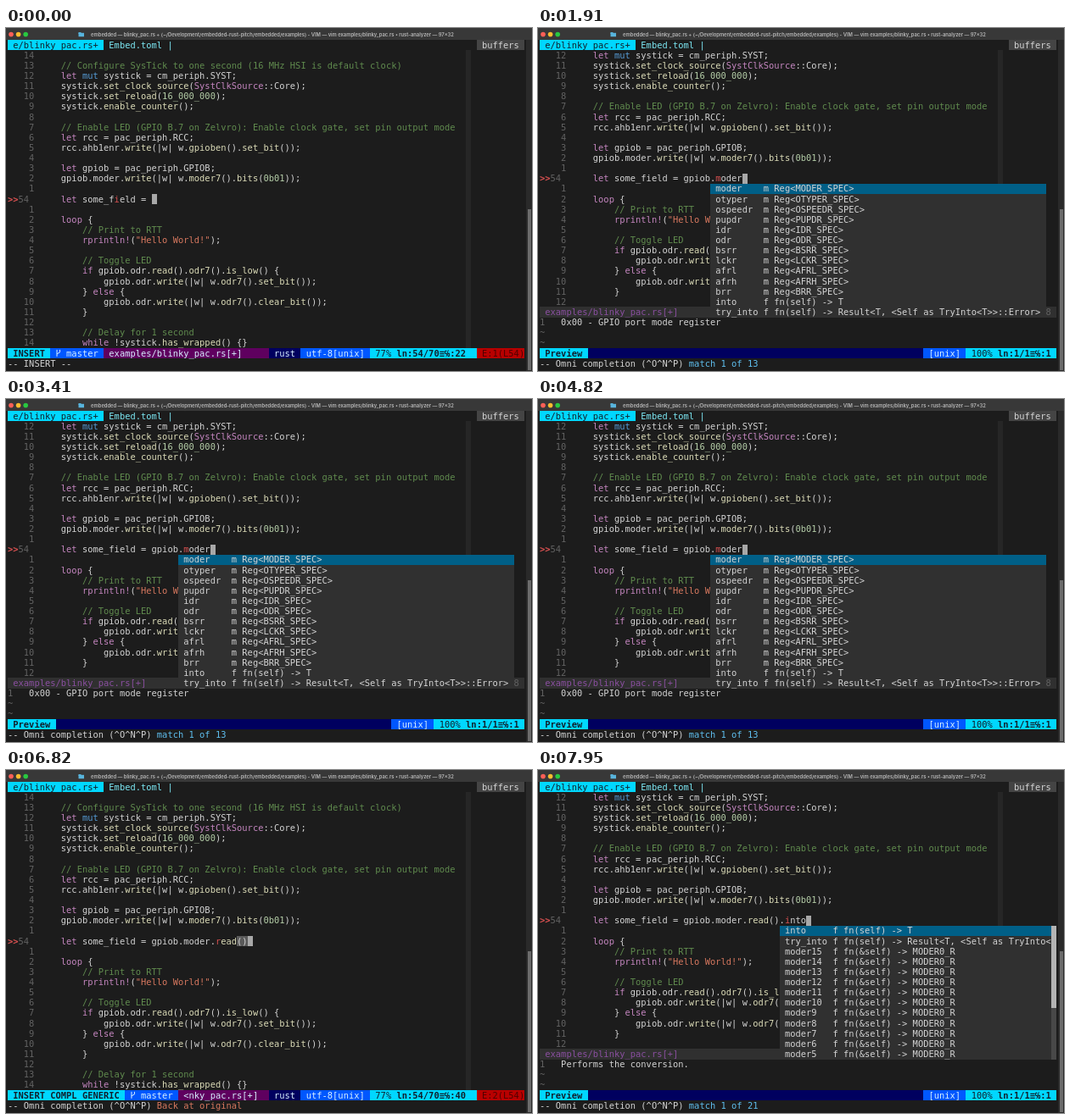
An HTML page with a canvas that plays this animation: 620x405 px, repeating every 8000 ms.

```html
<!DOCTYPE html>
<html lang="en">
<head>
<meta charset="utf-8">
<title>Editor completion</title>
<style>
html, body { margin: 0; width: 100%; height: 100%; overflow: hidden; background: #1c1c1c; }
canvas { display: block; }
</style>
</head>
<body>
<canvas id="stage" width="620" height="405"></canvas>
<script>
const ctx = document.getElementById("stage").getContext("2d");
const LOOP = 8000, COLS = 97, CELL_W = 6.28, CELL_H = 12.13, LEFT = 2, TOP = 14;
const MONO = '"DejaVu Sans Mono", monospace';
const C = {
  bg: "#1c1c1c", text: "#d4d4d4", dim: "#626262", comment: "#608b4e", keyword: "#c586c0",
  blue: "#569cd6", string: "#d7785f", number: "#b5cea8", call: "#dcdcb8", red: "#d75050",
  cyan: "#00d7ff", royal: "#0057ff", navy: "#00005f", purple: "#5f005f", menu: "#303030",
  selected: "#005f87", black: "#10202a", pale: "#d8f0ff"
};

const BEFORE = [
  "",
  "// Configure SysTick to one second (16 MHz HSI is default clock)",
  "let mut systick = cm_periph.SYST;",
  "systick.set_clock_source(SystClkSource::Core);",
  "systick.set_reload(16_000_000);",
  "systick.enable_counter();",
  "",
  "// Enable LED (GPIO B.7 on Zelvro): Enable clock gate, set pin output mode",
  "let rcc = pac_periph.RCC;",
  "rcc.ahb1enr.write(|w| w.gpioben().set_bit());",
  "",
  "let gpiob = pac_periph.GPIOB;",
  "gpiob.moder.write(|w| w.moder7().bits(0b01));",
  ""
];
const AFTER = [
  "",
  "loop {",
  "    // Print to RTT",
  '    rprintln!("Hello World!");',
  "",
  "    // Toggle LED",
  "    if gpiob.odr.read().odr7().is_low() {",
  "        gpiob.odr.write(|w| w.odr7().set_bit());",
  "    } else {",
  "        gpiob.odr.write(|w| w.odr7().clear_bit());",
  "    }",
  "",
  "    // Delay for 1 second",
  "    while !systick.has_wrapped() {}"
];
const PREFIX = "let some_field = ";

const INTO = ["into", "f", "fn(self) -> T"];
const TRY_INTO = ["try_into", "f", "fn(self) -> Result<T, <Self as TryInto<T>>::Error>"];
const registers = "moder otyper ospeedr pupdr idr odr bsrr lckr afrl afrh brr".split(" ")
  .map(name => [name, "m", `Reg<${name.toUpperCase()}_SPEC>`]);
const FIELDS = { col: 32, total: 13, items: [...registers, INTO, TRY_INTO] };
const METHODS = { col: 38, total: 8, items: [
  INTO, TRY_INTO,
  ["as_ptr", "f", "fn(&self) -> *mut <REG as RegisterSpec>::Ux"],
  ["read", "f", "fn(&self) -> <REG as Readable>::Reader"],
  ["reset", "f", "fn(&self)"],
  ["write", "f", "fn(&self, F)"],
  ["write_with_zero", "f", "unsafe fn(&self, F)"],
  ["modify", "f", "fn(&self, F)"]
] };
const READERS = { col: 45, total: 21, items: [INTO, TRY_INTO,
  ...Array.from({ length: 11 }, (_, i) => ["moder" + (15 - i), "f", "fn(&self) -> MODER0_R"])] };
const matching = start => ({ ...METHODS, items: METHODS.items.filter(([name]) => name.startsWith(start)) });

const STATES = [];
const at = (time, typed, extra = {}) => STATES.push({ time, typed, errors: 1, ...extra });
const typing = (start, gap, base, word, extra) =>
  [...word].forEach((_, i) => {
    const part = word.slice(0, i + 1);
    at(start + i * gap, base + part, typeof extra === "function" ? extra(part) : extra);
  });

at(0, "", { mark: 10 });
typing(300, 130, "", "gpiob.");
at(1200, "gpiob.", { menu: FIELDS, omni: true });
at(1560, "gpiob.moder", { menu: FIELDS, omni: true, preview: "0x00 - GPIO port mode register", mark: 23 });
at(5300, "gpiob.moder.", { errors: 2 });
at(5600, "gpiob.moder.", { errors: 2, menu: METHODS, omni: true });
typing(6050, 110, "gpiob.moder.", "read()", part =>
  ({ errors: 2, menu: matching(part), omni: true, generic: true, mark: 29 }));
at(7050, "gpiob.moder.read().", { errors: 2 });
at(7280, "gpiob.moder.read().", { errors: 2, menu: READERS, omni: true });
at(7500, "gpiob.moder.read().into", { menu: READERS, omni: true, preview: "Performs the conversion.", mark: 36 });

const colX = col => LEFT + col * CELL_W;
const rowY = row => TOP + row * CELL_H;

function fill(row, from, to, color, rows = 1) {
  const x = Math.round(colX(from)), y = Math.round(rowY(row));
  ctx.fillStyle = color;
  ctx.fillRect(x, y, Math.round(colX(to)) - x, Math.round(rowY(row + rows)) - y);
}

function put(row, col, text, color = C.text, bold = false) {
  ctx.font = `${bold ? "bold " : ""}10.4px ${MONO}`;
  ctx.textAlign = "left";
  ctx.fillStyle = color;
  [...text].forEach((ch, i) => {
    if (ch !== " ") ctx.fillText(ch, colX(col + i), rowY(row) + 9.6);
  });
}

function block(row, from, to, bg, text, color, bold) {
  fill(row, from, to, bg);
  put(row, from + 1, text, color, bold);
}

const TOKENS = /\/\/.*|"[^"]*"|rprintln!|SystClkSource|\b(?:let|loop|if|else|while|mut)\b|\b(?:0b01|16_000_000)\b|\w+(?=\()/g;
function tokenColor(token) {
  if (token.startsWith("//")) return C.comment;
  if (token[0] === '"') return C.string;
  if (token === "mut") return C.blue;
  if (/^\d/.test(token)) return C.number;
  return /^(let|loop|if|else|while|rprintln!|SystClkSource)$/.test(token) ? C.keyword : C.call;
}

function putCode(row, text) {
  let end = 0;
  for (const { 0: token, index } of text.matchAll(TOKENS)) {
    put(row, 10 + end, text.slice(end, index));
    put(row, 10 + index, token, tokenColor(token));
    end = index + token.length;
  }
  put(row, 10 + end, text.slice(end));
}

function drawWindow() {
  ctx.fillStyle = C.bg;
  ctx.fillRect(0, 0, 620, 405);
  ctx.fillStyle = "#383838";
  ctx.fillRect(0, 0, 620, 14);
  ["#ff5f57", "#febc2e", "#28c840"].forEach((color, i) => {
    ctx.fillStyle = color;
    ctx.beginPath();
    ctx.arc(6 + i * 8.6, 7.5, 2.8, 0, 7);
    ctx.fill();
  });
  ctx.fillStyle = "#58b4dc";
  ctx.fillRect(85.5, 5, 3, 2);
  ctx.fillRect(85.5, 5.8, 6.5, 4.4);
  ctx.font = "600 5.8px Inter, sans-serif";
  ctx.textAlign = "center";
  ctx.fillStyle = "#b8b8b8";
  ctx.fillText("embedded — blinky_pac.rs + (~/Development/embedded-rust-pitch/embedded/examples) - VIM — vim examples/blinky_pac.rs • rust-analyzer — 97×32", 314, 9.7);

  block(0, 0, 18, C.cyan, "e/blinky_pac.rs+", C.black);
  put(0, 19, "Embed.toml |", "#7ce8f4");
  block(0, 88, COLS, "#444444", "buffers", C.text);

  ctx.fillStyle = "#2a2a2a";
  ctx.fillRect(613, 14, 7, 391);
  ctx.fillStyle = "#6c6c6c";
  ctx.fillRect(615, 214, 4, 190);
}

function drawCode({ typed, preview, mark }) {
  const skip = preview ? 2 : 0, lastRow = preview ? 25 : 29;
  const current = PREFIX + typed, cursorRow = 15 - skip;
  fill(1, 86, 87, "#262626", lastRow);
  for (let row = 1; row <= lastRow; row++) {
    const offset = row - cursorRow;
    if (!offset) continue;
    put(row, 3, String(Math.abs(offset)).padStart(2), C.dim);
    putCode(row, offset < 0 ? BEFORE[BEFORE.length + offset] : AFTER[offset - 1]);
  }
  put(cursorRow, 0, ">>", C.red, true);
  put(cursorRow, 2, "54", C.dim);
  if (current.endsWith("()")) fill(cursorRow, 8 + current.length, 10 + current.length, "#5a5a5a");
  putCode(cursorRow, current);
  if (mark !== undefined) {
    fill(cursorRow, 10 + mark, 11 + mark, C.bg);
    put(cursorRow, 10 + mark, current[mark], C.red);
  }
  fill(cursorRow, 10 + current.length, 11 + current.length, "#a8a8a8");
}

function drawBranch(col) {
  const x = colX(col), y = rowY(30);
  ctx.strokeStyle = C.pale;
  ctx.lineWidth = 1;
  ctx.beginPath();
  ctx.moveTo(x + 1.5, y + 2);
  ctx.lineTo(x + 1.5, y + 10);
  ctx.moveTo(x + 1.5, y + 7);
  ctx.lineTo(x + 5, y + 5);
  ctx.lineTo(x + 5, y + 2);
  ctx.stroke();
}

function drawStatus({ typed, generic, errors }) {
  const branch = generic ? 22 : 8;
  const column = PREFIX.length + typed.length + 5;
  block(30, 0, branch, C.cyan, generic ? "INSERT COMPL GENERIC" : "INSERT", C.black, true);
  block(30, branch, branch + 10, C.royal, "  master", C.pale);
  drawBranch(branch + 1);
  block(30, branch + 10, 49, C.purple, generic ? "<nky_pac.rs[+]" : "examples/blinky_pac.rs[+]", C.pale);
  block(30, 49, 55, C.navy, "rust", C.pale);
  block(30, 55, 68, C.royal, "utf-8[unix]", C.pale);
  block(30, 68, 88, C.cyan, "77%", C.black);
  put(30, 73, `ln:54/70≡℅:${column}`, C.black, true);
  block(30, 88, COLS, "#b80000", `E:${errors}(L54)`, "#500000");
}

function drawPreview({ preview, typed }) {
  block(26, 0, COLS, "#303030", "examples/blinky_pac.rs[+]", "#8a4fa0");
  put(26, 94, String(PREFIX.length + typed.length), C.dim);
  put(27, 0, "1", C.dim);
  put(27, 4, preview);
  put(28, 0, "~", C.dim);
  put(29, 0, "~", C.dim);
  block(30, 0, 9, C.cyan, "Preview", C.black, true);
  fill(30, 9, 72, C.navy);
  block(30, 72, 80, C.royal, "[unix]", C.pale);
  block(30, 80, COLS, C.cyan, "100%", C.black);
  put(30, 86, "ln:1/1≡℅:1", C.black, true);
}

function drawMenu({ menu: { col, items, total }, preview }) {
  if (!items.length) return;
  const top = preview ? 14 : 16;
  const nameWidth = Math.max(...items.map(([name]) => name.length)) + 1;
  const lines = items.map(([name, kind, type]) => ` ${name.padEnd(nameWidth)}${kind} ${type} `);
  const right = Math.min(COLS, col + Math.max(...lines.map(line => line.length)));
  const scrolls = total > items.length;
  fill(top, col, right, C.menu, items.length);
  if (preview) fill(top, col, right, C.selected);
  lines.forEach((line, i) => put(top + i, col, line.slice(0, right - col - (scrolls ? 1 : 0)), C.text));
  if (scrolls) {
    fill(top, right - 1, right, "#484848", items.length);
    fill(top, right - 1, right, "#b4b4b4", Math.round(items.length ** 2 / total));
  }
}

function drawMessage({ omni, preview, menu }) {
  if (!omni) return put(31, 0, "-- INSERT --");
  put(31, 0, "-- Omni completion (^O^N^P)");
  if (preview) put(31, 28, `match 1 of ${menu.total}`, "#5fbfef");
  else put(31, 28, "Back at original", "#d7785f");
}

function draw(time) {
  const state = STATES.findLast(s => s.time <= time);
  drawWindow();
  drawCode(state);
  (state.preview ? drawPreview : drawStatus)(state);
  if (state.menu) drawMenu(state);
  drawMessage(state);
}

const started = performance.now();
function tick() {
  draw((performance.now() - started) % LOOP);
  requestAnimationFrame(tick);
}
tick();
</script>
</body>
</html>
```
